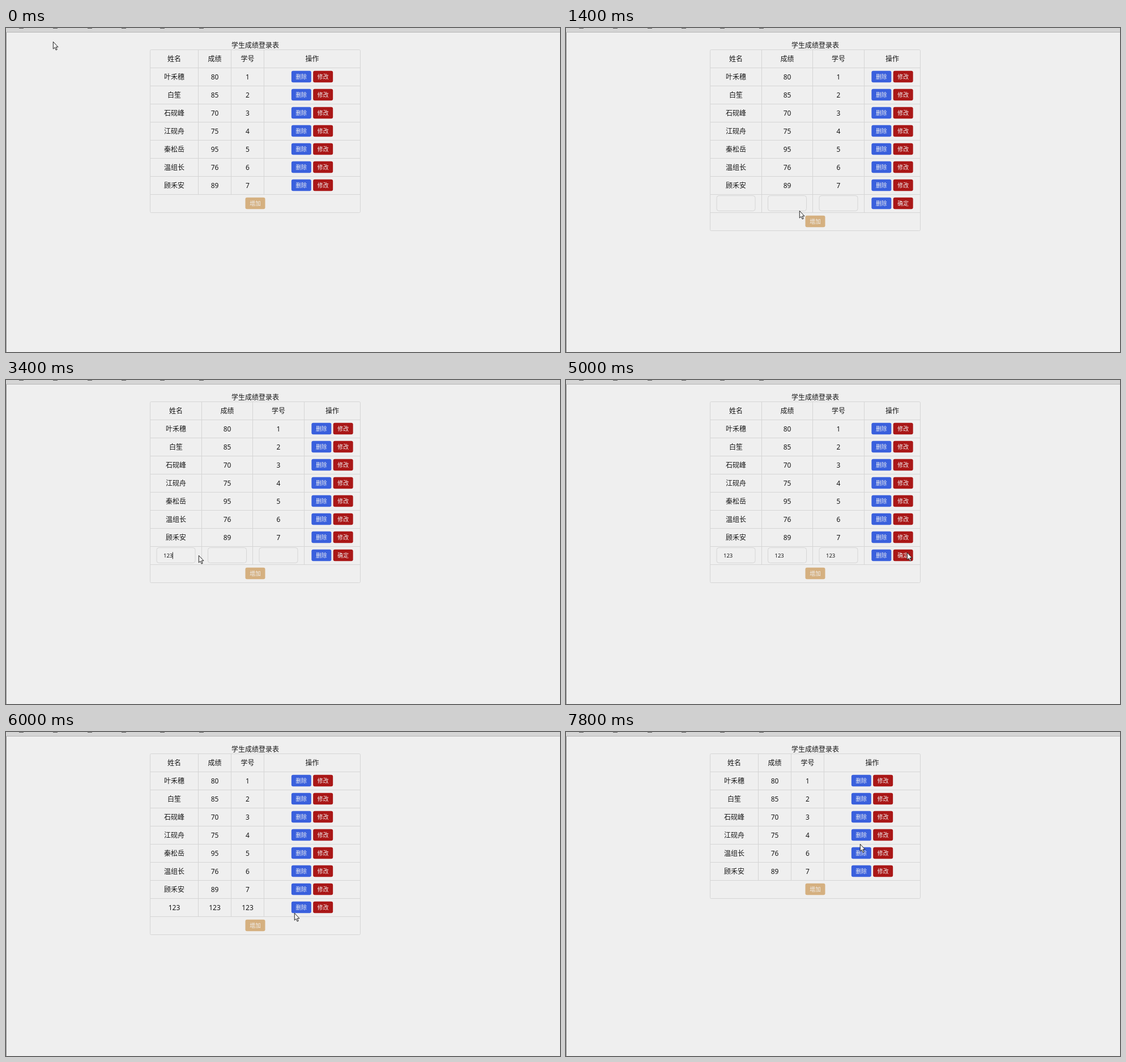
These frames come from a looping animation (978x573 px, 8000 ms). An HTML page:

```html
<!DOCTYPE html>
<html lang="zh-CN">
<head>
<meta charset="utf-8">
<title>学生成绩登录表</title>
<style>
  html, body { margin: 0; width: 100%; height: 100%; overflow: hidden; background: #efefef; }
  svg { display: block; width: 978px; height: 573px; }
  text { font: 12px "Noto Sans", "Noto Sans CJK SC", "Noto Sans CJK", sans-serif; fill: #161616; text-anchor: middle; }
  .button { font-size: 9.8px; fill: #f0f0f0; }
  .entry { font-size: 9.5px; text-anchor: start; }
  .grid { fill: none; stroke: #d5d5d5; }
</style>
</head>
<body>
<svg viewBox="0 0 978 573">
  <rect width="978" height="573" fill="#efefef"/>
  <rect width="978" height="7" fill="#d5d5d5"/>
  <path d="M0 7.5H978" stroke="#b6b6b6"/>
  <path d="M.5 8V573" stroke="#8c8c8c"/>
  <path d="M23 .5h8m52 0h8m53 0h8m52 0h8m60 0h8m61 0h8" stroke="#555"/>
  <text x="440" y="35">学生成绩登录表</text>
  <g id="table"></g>
  <path id="pointer" d="M.3 .3V13L3.2 10.4L5.2 15L7.2 14.1L5.2 9.7H9Z" fill="#f4f4f4" stroke="#222"/>
</svg>
<script>
const LOOP = 8000, STEP = 200;
const LEFT = 254.5, RIGHT = 625.5, TOP = 38.5, ROW = 32;
const BUTTON_WIDTH = 35, BUTTON_GAP = 3.3, FIELD_WIDTH = 68, DIGIT_WIDTH = 5.43;
const BLUE = '#3a60dd', RED = '#aa1717', TAN = '#d5b080';

// Moments of the clicks and of the focus in each field, in ms
const ADD = 1400, CONFIRM = 5200, REMOVE_ADDED = 6400, REMOVE_FIFTH = 7400;
const FOCUS = [1600, 3800, 4200], KEY_DELAY = 130;

const students = [
  ['叶禾穗', 80], ['白笙', 85], ['石砚峰', 70], ['江砚舟', 75],
  ['秦松岳', 95], ['温组长', 76], ['顾禾安', 89]
].map(([name, score], i) => [name, score, i + 1]);

// Key points of the pointer: time, x, y
const route = [
  [0, 83, 24], [800, 479, 397], [1200, 437, 310], [1400, 412, 323], [1800, 318, 311],
  [3400, 340, 310], [5000, 602, 305], [5200, 516, 322], [6600, 504, 319],
  [7200, 524, 215], [7800, 519, 198]
];

const table = document.getElementById('table');
const pointer = document.getElementById('pointer');

const rowTop = i => TOP + i * ROW;
const label = (x, y, content, kind = '') => `<text class="${kind}" x="${x}" y="${y}">${content}</text>`;

const button = (center, top, content, color) =>
  `<rect x="${center - BUTTON_WIDTH / 2}" y="${top + 5.3}" width="${BUTTON_WIDTH}" height="20.4" rx="3" fill="${color}"/>` +
  label(center, top + 19.3, content, 'button');

function actions(center, top, second) {
  const offset = (BUTTON_WIDTH + BUTTON_GAP) / 2;
  return button(center - offset, top, '删除', BLUE) + button(center + offset, top, second, RED);
}

// The first column has its own width, the next two share one, the last takes the rest
function columns(first, other) {
  const edges = [0, 1, 2].map(i => LEFT + Math.round(first + i * other));
  const bounds = [LEFT, ...edges, RIGHT];
  const centers = bounds.slice(1).map((edge, i) => (edge + bounds[i]) / 2);
  return { edges, centers };
}

function entry(time, i, center, top) {
  const x = center - FIELD_WIDTH / 2, textX = x + 12;
  const typed = '123'.slice(0, Math.max(0, Math.floor((time - FOCUS[i]) / KEY_DELAY)));
  const focused = i === FOCUS.findLastIndex(start => time >= start);
  const caretX = textX + typed.length * DIGIT_WIDTH;
  return `<rect class="grid" x="${x}" y="${top + 2}" width="${FIELD_WIDTH}" height="27" rx="4"/>` +
    label(textX, top + 19.2, typed, 'entry') +
    (focused && time % 1000 >= 400 ? `<path d="M${caretX} ${top + 10}v12" stroke="#222"/>` : '');
}

function drawTable(time) {
  const editing = time >= ADD && time < CONFIRM;
  const { edges, centers } = editing ? columns(90.7, 90.7) : columns(85, 58);
  const rows = students.filter(student => student[2] !== 5 || time < REMOVE_FIFTH);
  if (time >= CONFIRM && time < REMOVE_ADDED) rows.push([123, 123, 123]);

  const rowLabels = (values, i) =>
    values.map((value, column) => label(centers[column], rowTop(i) + 20.5, value)).join('');

  let markup = rowLabels(['姓名', '成绩', '学号', '操作'], 0);
  rows.forEach((row, i) => {
    markup += rowLabels(row, i + 1) + actions(centers[3], rowTop(i + 1), '修改');
  });

  let count = rows.length + 1;
  if (editing) {
    const top = rowTop(count++);
    markup += FOCUS.map((_, i) => entry(time, i, centers[i], top)).join('') + actions(centers[3], top, '确定');
  }

  const footer = rowTop(count);
  let grid = edges.map(x => `M${x} ${TOP}V${footer}`).join('');
  for (let i = 1; i <= count; i++) grid += `M${LEFT} ${rowTop(i)}H${RIGHT}`;

  table.innerHTML =
    `<rect class="grid" x="${LEFT}" y="${TOP}" width="${RIGHT - LEFT}" height="${footer + ROW - TOP}" rx="2"/>` +
    `<path class="grid" d="${grid}"/>` + markup + button((LEFT + RIGHT) / 2, footer, '增加', TAN);
}

function movePointer(time) {
  const next = Math.max(1, route.findIndex(point => point[0] >= time));
  const [t0, x0, y0] = route[next - 1], [t1, x1, y1] = route[next];
  const part = (time - t0) / (t1 - t0);
  const eased = part * part * (3 - 2 * part);
  const mix = (a, b) => Math.round(a + (b - a) * eased);
  pointer.setAttribute('transform', `translate(${mix(x0, x1)} ${mix(y0, y1)})`);
}

let shown = -1;
function tick() {
  const time = Math.floor(performance.now() % LOOP / STEP) * STEP;
  if (time !== shown) {
    shown = time;
    drawTable(time);
    movePointer(time);
  }
  requestAnimationFrame(tick);
}
tick();
</script>
</body>
</html>
```
